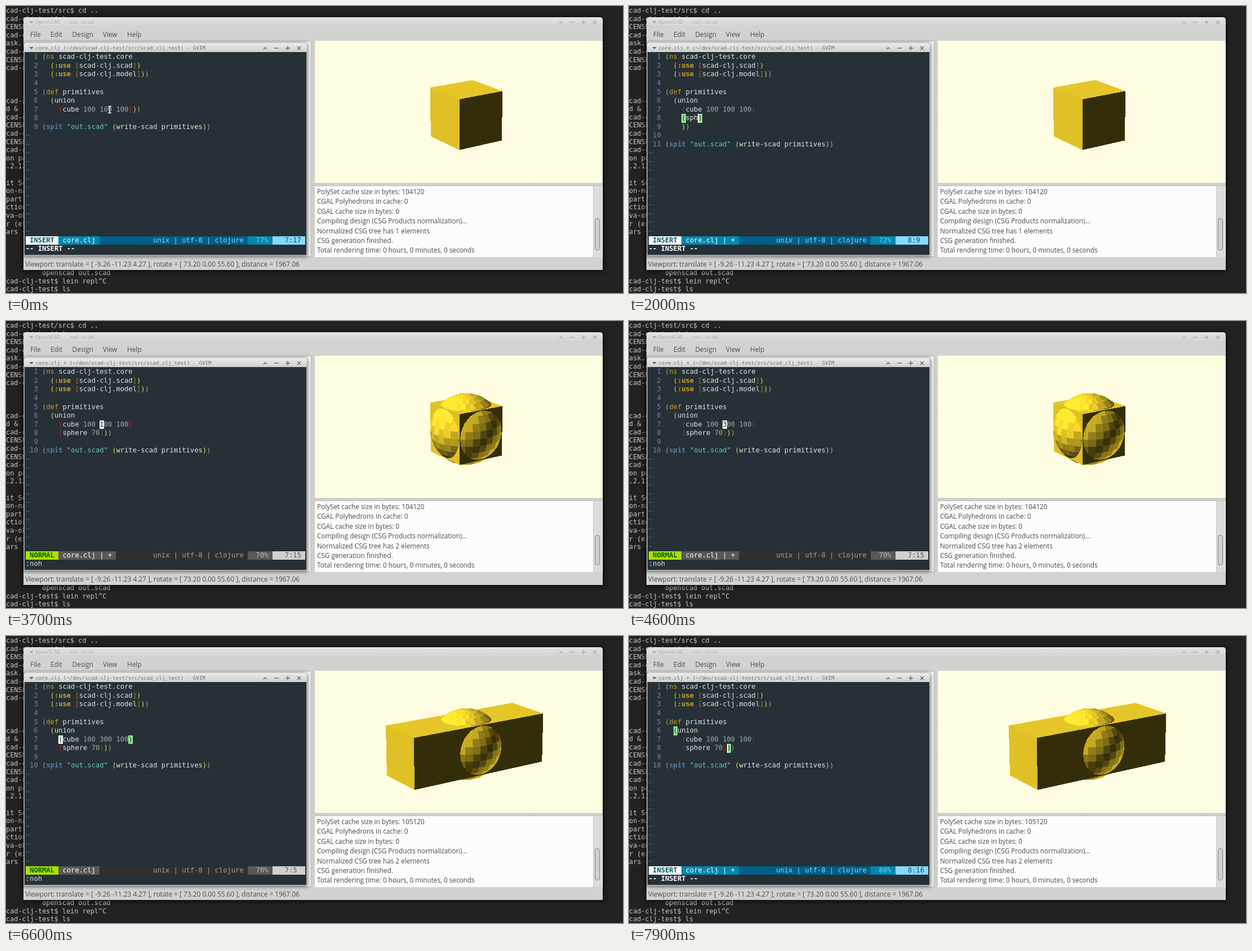
Recreate the animation shown at these times as an HTML page with a canvas. Size 1095 by 511 pixels, loop 8000 ms.

```html
<!DOCTYPE html>
<html lang="en">
<head>
<meta charset="utf-8">
<title>scad-clj live preview</title>
<style>
html, body { margin: 0; width: 100%; height: 100%; overflow: hidden; background: #222; }
#stage { position: absolute; left: 0; top: 0; width: 1095px; height: 511px; overflow: hidden; background: #222; }
#stage div, #stage canvas, #stage svg { position: absolute; box-sizing: border-box; }
.t { white-space: pre; line-height: 16px; height: 16px; }
.term { font: 11.85px/16px "DejaVu Sans Mono", monospace; color: #c6c6c6; }
.ui { font: 11.75px/16px "Open Sans", sans-serif; color: #4b4b4b; }
.title { font: 9.1px/16px "DejaVu Sans Mono", monospace; color: #666; text-shadow: 0 1px #f4f4f4; }
.title.off { color: #a2a2a2; }
.dots { background: #d2d3d1 radial-gradient(circle, #a9aaa8 35%, transparent 45%) 0 0 / 3px 3px; }
.row { left: 34.8px; height: 15.53px; font: 12.13px/15.53px "DejaVu Sans Mono", monospace; color: #dde5e2; white-space: pre; }
.row span { display: inline-block; height: 15.53px; vertical-align: top; }
.nr { color: #78858b; } .tilde { color: #476377; }
.key { color: #c2a020; } .use { color: #c9a227; font-weight: bold; }
.spit { color: #587aa3; font-weight: bold; } .str { color: #6cc7bd; } .num { color: #9aa9a9; }
.sq { color: #a8762c; } .p1 { color: #93b09c; } .p2 { color: #e3dc4c; } .p3 { color: #c32222; }
.row .match { background: #90ee90; color: #1c2a20; }
.row .block { background: #fff; color: #1c2428; }
.row .bar { box-shadow: inset 2px 0 #fff; }
</style>
</head>
<body>
<div id="stage"></div>
<script>
const stage = document.getElementById('stage');

function add(tag, css, cls = '') {
  const el = document.createElement(tag);
  el.style.cssText = css;
  el.className = cls;
  return stage.appendChild(el);
}
const box = (x, y, w, h, css, cls) =>
  add('div', `left:${x}px;top:${y}px;width:${w}px;height:${h}px;${css}`, cls);
function text(x, y, str, cls) {
  const el = add('div', `left:${x}px;top:${y - 8}px`, 't ' + cls);
  el.textContent = str;
  return el;
}
function lines(x, y, w, h, path, color, width = 1.3) {
  const svg = box(x, y, w, h, '');
  svg.innerHTML = `<svg width="${w}" height="${h}"><path d="${path}" fill="none" stroke="${color}" stroke-width="${width}"/></svg>`;
  return svg;
}
function titleBar(y, str, right, off) {
  const color = off ? '#a8a8a8' : '#666';
  box(41, y - 2, 0, 0, `border:4px solid transparent;border-top-color:${color};border-bottom:0`);
  ['M2 7L5 4L8 7', 'M1 5H9', 'M1 5H9M5 1V9', 'M2 2L8 8M8 2L2 8'].forEach((d, i) =>
    lines(right + i * 20 - 5, y - 5, 10, 10, d, color));
  return text(52.5, y, str, off ? 'title off' : 'title');
}

// Terminal behind the windows
const rows = ['cad-clj-test/src$ cd ..', 'cad-clj-test$ ls', 'CENSE', 'cad-clj', 'ask.', 'cad-clj', 'CENSE', 'cad-clj',
  '', '', '', 'cad-clj', 'd & ', 'cad-clj', 'CENSE', 'cad-clj', 'CENSE', 'cad-clj', 'on port', '.2.12', '', 'it Se', 'on-name',
  'part-', 'ction', 'va-obj', 'r (exit', 'ars +', '', '', '', '', '         openscad out.scad', 'cad-clj-test$ lein repl^C', 'cad-clj-test$ ls'];
rows.forEach((s, i) => s && text(0, 8 + 14.6 * i, s, 'term'));

// OpenSCAD window
box(31, 20, 1028, 450, 'background:#d2d3d1;border-radius:5px 5px 0 0;box-shadow:0 1px 7px 2px rgba(0,0,0,.6)');
box(31, 20, 1028, 18, 'background:linear-gradient(#e2e2e1,#d0d1cf);border-radius:5px 5px 0 0;border-top:1px solid #ececec');
titleBar(28.5, 'OpenSCAD - out.scad', 985, true);
[['File', 43], ['Edit', 79], ['Design', 117.5], ['View', 172], ['Help', 215]].forEach(([s, x]) => text(x, 49.5, s, 'ui'));
box(33, 62, 509, 385, 'background:#f4f4f3;border:1px solid #b5b5b3');
box(543, 62, 5, 385, '', 'dots');
box(548, 62, 511, 253, 'background:#fffde1');
box(548, 315, 511, 6, '', 'dots');
box(548, 321, 511, 126, 'background:#fcfcfc');
box(1042, 321, 16, 126, 'background:#dcdddb;border-left:1px solid #c6c6c5');
const thumb = box(1045, 378, 9, 57, 'background:#d0d1cf;border:1px solid #858684;border-radius:4px');
const log = ['', 'CGAL Polyhedrons in cache: 0', 'CGAL cache size in bytes: 0', 'Compiling design (CSG Products normalization)...',
  '', 'CSG generation finished.', 'Total rendering time: 0 hours, 0 minutes, 0 seconds']
  .map((s, i) => text(552, 330 + 17.4 * i, s, 'ui'));
text(34, 459, 'Viewport: translate = [ -9.26 -11.23 4.27 ], rotate = [ 73.20 0.00 55.60 ], distance = 1967.06', 'ui')
  .style.fontSize = '11.85px';

// GVIM window
box(32, 66, 502, 378, 'background:#263036;border:1px solid #aaa;border-radius:4px 4px 0 0;box-shadow:0 1px 7px 1px rgba(0,0,0,.55)');
box(32, 66, 502, 16, 'background:linear-gradient(#e9e9e8,#cfd0ce);border-radius:4px 4px 0 0;border-top:1px solid #f4f4f4');
const title = titleBar(75, '', 460, false);
const grid = Array.from({ length: 23 }, (_, i) => add('div', `top:${83.4 + 15.53 * i}px`, 'row'));
const mouse = lines(179, 177, 10, 15, 'M2 1.5H4L5 2.5L6 1.5H8M5 2.5V12.5M2 13.5H4L5 12.5L6 13.5H8', '#fff', 1.4);

// 3D view: rays against convex solids given as half-spaces
const rad = Math.PI / 180, dist = 1967.06, focal = 1797;
const dot = (a, b) => a[0] * b[0] + a[1] * b[1] + a[2] * b[2];
const c = Math.cos(55.6 * rad), s = Math.sin(55.6 * rad), C = Math.cos(16.8 * rad), S = Math.sin(16.8 * rad);
const ex = [c, s, 0], ey = [-s * C, c * C, -S], ez = [-s * S, c * S, C];
const eye = [-9.26, -11.23, 4.27].map((v, i) => v - dist * ey[i]);
const light = ex.map((_, i) => (-ex[i] - ey[i] + ez[i]) / Math.sqrt(3));

const plane = (n, d, tint = 1) =>
  ({ n, gap: d - dot(n, eye), shade: (.2 + Math.abs(dot(n, light))) * tint });

const cube = (...size) => size.flatMap((w, axis) => [1, -1].map(sign =>
  plane([0, 1, 2].map(i => i === axis ? sign : 0), w / 2)));

function sphere(r, sides = 30, rings = 15) {
  const at = i => {
    const phi = Math.PI * (i + .5) / rings;
    return [r * Math.sin(phi) * Math.cos(Math.PI / sides), r * Math.cos(phi)];
  };
  const out = [plane([0, 0, 1], at(0)[1]), plane([0, 0, -1], at(0)[1])];
  for (let i = 0; i < rings - 1; i++) {
    const [r0, z0] = at(i), [r1, z1] = at(i + 1), len = Math.hypot(r1 - r0, z0 - z1);
    const nr = (z0 - z1) / len, nz = (r1 - r0) / len;
    for (let j = 0; j < sides; j++) {
      const a = 2 * Math.PI * (j + .5) / sides;
      out.push(plane([nr * Math.cos(a), nr * Math.sin(a), nz], nr * r0 + nz * z0, (i + j) % 2 ? .94 : 1.06));
    }
  }
  return out;
}

function cast(planes, ray) {
  let near = -1e9, far = 1e9, face;
  for (const p of planes) {
    const k = dot(p.n, ray), t = p.gap / k;
    if (k < 0) { if (t > near) { near = t; face = p; } }
    else if (t < far) far = t;
    if (near > far) return null;
  }
  return { near, face };
}

function render(...solids) {
  const cv = add('canvas', 'left:548px;top:62px;visibility:hidden');
  cv.width = 511; cv.height = 253;
  const ctx = cv.getContext('2d'), img = ctx.createImageData(511, 253);
  for (let y = 0; y < 253; y++) for (let x = 0; x < 511; x++) {
    const u = (x + .5 - 255.3) / focal, v = (126.3 - y - .5) / focal;
    const ray = ey.map((e, i) => e + ex[i] * u + ez[i] * v);
    let best = null;
    for (const solid of solids) {
      const hit = cast(solid, ray);
      if (hit && (!best || hit.near < best.near)) best = hit;
    }
    if (best) {
      const k = best.face.shade;
      img.data.set([249 * k, Math.min(215 * k, 236), Math.min(44 * k, 48), 255], (y * 511 + x) * 4);
    }
  }
  ctx.putImageData(img, 0, 0);
  return cv;
}
const ball = sphere(70);
const views = [render(cube(100, 100, 100)), render(cube(100, 100, 100), ball), render(cube(100, 300, 100), ball)];

// Editing session: time, body lines, row, column, flags (i insert, + modified, m mouse shown)
const head = ['(ns scad-clj-test.core', '  (:use [scad-clj.scad])', '  (:use [scad-clj.model]))', '', '(def primitives', '  (union'];
const tail = ['', '(spit "out.scad" (write-scad primitives))'];
const box3 = '    (cube 100 100 100)', long = '    (cube 100 300 100)', end = '    ))';
const joined = [box3, '    (sphere 70)))'], wide = [long, joined[1]];
const typed = str => [box3, `    ${str})`, end];
const word = '(sphere ';
const steps = [
  [0, [box3 + '))'], 7, 17, 'im'],
  [300, [box3 + '))'], 7, 20, 'i'],
  [500, [box3 + '))'], 7, 23, 'i'],
  [700, [box3, end], 8, 5, 'i+'],
  [900, [box3, '    ', end], 8, 5, 'i+'],
  ...[...word].map((_, i) => [1700 + i * 100, typed(word.slice(0, i + 1)), 8, 6 + i, 'i+']),
  [3000, typed('(sphere 7'), 8, 14, 'i+'],
  [3100, typed('(sphere 70'), 8, 15, 'i+'],
  [3200, joined, 8, 15, '+'],
  [3300, joined, 8, 15, ''],
  [3500, joined, 7, 15, ''],
  [3700, joined, 7, 15, '+'],
  [4200, wide, 7, 15, '+'],
  [4700, wide, 7, 15, ''],
  [5000, wide, 8, 15, ''],
  [5200, wide, 8, 5, ''],
  [5900, wide, 7, 5, ''],
  [6800, wide, 7, 11, ''],
  [6900, wide, 7, 15, ''],
  [7200, joined, 7, 15, '+'],
  [7400, joined, 8, 15, '+'],
  [7600, joined, 8, 16, 'i+']
];
const scenes = [[0, 0], [3500, 1], [6300, 2]];

const words = { ns: 'key', def: 'key', ':use': 'use', spit: 'spit' };

// One class list per character; parens are coloured by depth and paired
function parse(doc) {
  const open = [], pairs = {};
  const cells = doc.map((line, row) => {
    const out = [];
    for (const [tok] of line.matchAll(/"[^"]*"|[()[\]]|[^\s()[\]"]+|\s/g)) {
      let cls = words[tok] || (tok[0] === '"' ? 'str' : /^\d+$/.test(tok) ? 'num' : '');
      const here = row + ',' + out.length;
      if ('[]'.includes(tok)) cls = 'sq';
      if (tok === '(') { open.push(here); cls = 'p' + open.length; }
      if (tok === ')') {
        cls = 'p' + open.length;
        const mate = open.pop();
        pairs[here] = mate;
        pairs[mate] = here;
      }
      for (const ch of tok) out.push({ ch, cls });
    }
    return out;
  });
  return { cells, pairs };
}

const span = (str, cls, css = '') =>
  `<span class="${cls}" style="${css}">${str.replace(/&/g, '&amp;').replace(/</g, '&lt;')}</span>`;
function runs(cells) {
  let html = '', str = '', cls = '';
  for (const cell of [...cells, { ch: '', cls: null }]) {
    if (cell.cls !== cls) { if (str) html += span(str, cls); str = ''; cls = cell.cls; }
    str += cell.ch;
  }
  return html;
}

const themes = {
  i: ['INSERT', '#fff;color:#005f5f', '#0087af;color:#fff', '#005f87;color:#87d7ff', '#0087af;color:#7ccdf2', '#87d7ff;color:#005f5f'],
  n: ['NORMAL', '#afdf00;color:#005f00', '#585858;color:#fff', '#303030;color:#a0a0a0', '#585858;color:#bcbcbc', '#d0d0d0;color:#585858']
};

function drawEditor([, body, row, col, flags]) {
  const insert = flags.includes('i'), dirty = flags.includes('+');
  const doc = [...head, ...body, ...tail], { cells, pairs } = parse(doc);
  const line = cells[row - 1];
  while (line.length < col) line.push({ ch: ' ', cls: '' });
  const here = `${row - 1},${col - 1}`;
  if (pairs[here]) for (const key of [here, pairs[here]]) {
    const [r, k] = key.split(',');
    cells[r][k].cls += ' match';
  }
  if (!flags.includes('m')) line[col - 1].cls += insert ? ' bar' : ' block';

  for (let i = 0; i < 21; i++)
    grid[i].innerHTML = i < doc.length ? span(String(i + 1).padStart(3) + ' ', 'nr') + runs(cells[i]) : span('~', 'tilde');

  const [mode, ...bg] = themes[insert ? 'i' : 'n'];
  const file = ` core.clj ${dirty ? '| + ' : ''}`;
  const parts = [` ${mode} `, file, 'unix | utf-8 | clojure '.padStart(46 - file.length),
    `  ${Math.floor(row / doc.length * 100)}% `, `   ${row}:${col}`.padEnd(8)];
  grid[21].innerHTML = parts.map((p, i) => span(p, '', `background:${bg[i]}${i ? '' : ';font-weight:bold'}`)).join('');
  grid[22].innerHTML = insert ? span('-- INSERT --', '', 'color:#fff;font-weight:bold') : row > 0 ? span(':noh', '') : '';
  title.textContent = `core.clj ${dirty ? '+ ' : ''}(~/dev/scad-clj-test/src/scad_clj_test) - GVIM`;
  mouse.style.visibility = flags.includes('m') ? 'visible' : 'hidden';
}

function drawScene([, n]) {
  views.forEach((v, i) => v.style.visibility = i === n ? 'visible' : 'hidden');
  log[0].textContent = `PolySet cache size in bytes: ${n === 2 ? 105120 : 104120}`;
  log[4].textContent = `Normalized CSG tree has ${n ? 2 : 1} elements`;
  const top = [378, 381, 378][n];
  thumb.style.top = top + 'px';
  thumb.style.height = 435 - top + 'px';
}

const current = (table, t) => table.findLast(step => step[0] <= t);
let step, scene;
function show(t) {
  const a = current(steps, t), b = current(scenes, t);
  if (a !== step) drawEditor(step = a);
  if (b !== scene) drawScene(scene = b);
}
show(0);
const start = performance.now();
(function tick() {
  show((performance.now() - start) % 8000);
  requestAnimationFrame(tick);
})();
</script>
</body>
</html>
```
